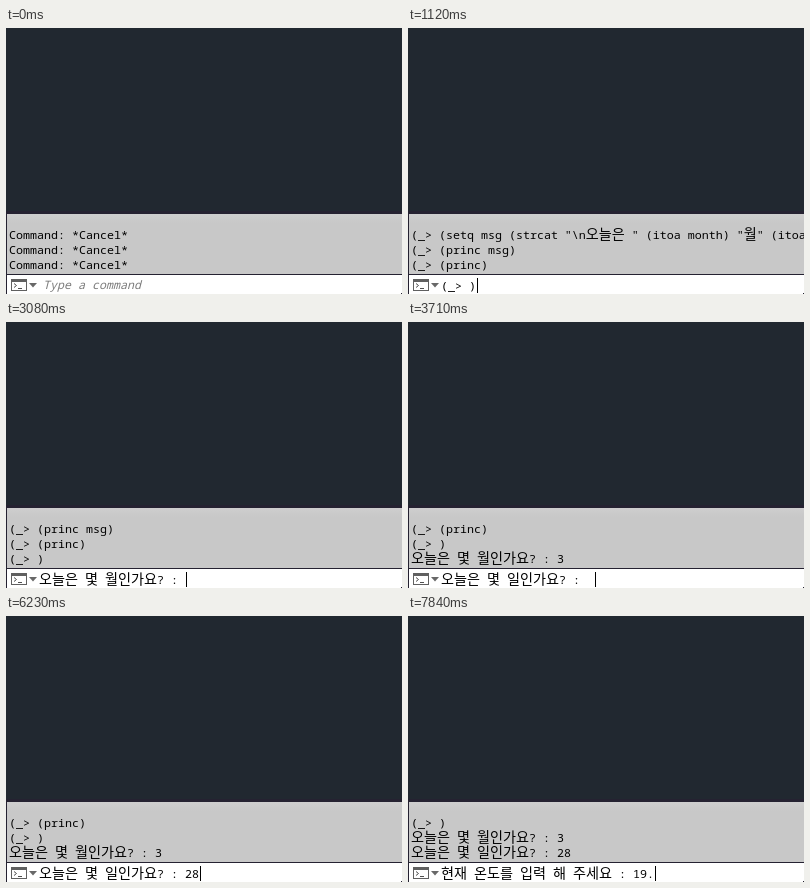
Write an HTML page that moves like this. It is 396 px wide and 266 px high and loops after 8000 ms.

```html
<!DOCTYPE html>
<html lang="ko">
<head>
<meta charset="utf-8">
<title>Command line</title>
<style>
  html, body { margin: 0; width: 100%; height: 100%; overflow: hidden; background: #212830; }
  svg { display: block; }
  text { font: 11.667px "Noto Sans Mono", "DejaVu Sans Mono", monospace; white-space: pre; fill: #000; }
  .ko { font: 14.13px "Noto Sans CJK KR", "Noto Sans CJK", sans-serif; }
  #hint { font-style: italic; fill: #7c7c7c; }
</style>
</head>
<body>
<svg width="396" height="266" viewBox="0 0 396 266">
  <defs>
    <linearGradient id="panel" x1="0" y1="0" x2="0" y2="1">
      <stop offset="0" stop-color="#cecece"/>
      <stop offset=".15" stop-color="#c8c8c8"/>
    </linearGradient>
  </defs>
  <rect width="396" height="266" fill="#212830"/>
  <g shape-rendering="crispEdges">
    <rect y="183" width="396" height="83" fill="#252231"/>
    <rect x="1" y="186" width="395" height="60" fill="url(#panel)"/>
    <rect x="1" y="247" width="395" height="19" fill="#fff"/>
    <rect x="395" y="265" width="1" height="1" fill="#252231"/>
    <rect x="5.5" y="251.5" width="15" height="11" fill="#fff" stroke="#606060"/>
    <rect x="5" y="251" width="16" height="3" fill="#606060"/>
  </g>
  <path d="M8 255.5l2.5 2-2.5 2M12 260.5h4" fill="none" stroke="#505050"/>
  <path d="M23 255h8l-4 4.5z" fill="#686868"/>
  <text class="log" x="3" y="211"></text>
  <text class="log" x="3" y="226"></text>
  <text class="log" x="3" y="241"></text>
  <text id="hint" x="37" y="261">Type a command</text>
  <text id="input" x="33" y="262"></text>
  <rect id="caret" y="250" width="1" height="15" shape-rendering="crispEdges"/>
</svg>
<script>
  const LOOP = 8000, OFF = -9;
  const month = '오늘은 몇 월인가요? : ';
  const day = '오늘은 몇 일인가요? : ';
  const temp = '현재 온도를 입력 해 주세요 : ';
  const cancel = 'Command: *Cancel*';
  const lines = [
    cancel, cancel, cancel,
    '(_> (setq msg (strcat "\\n오늘은 " (itoa month) "월" (itoa day) "일"',
    '(_> (princ msg)', '(_> (princ)', '(_> )',
    month + '3', day + '28'
  ];

  // [start ms, first log line, input text, caret x]
  const steps = [
    [0, 0, null, OFF],
    [490, 0, '', 34],
    [1120, 3, '(_> )', 69],
    [1680, 3, '(_> )', OFF],
    [1890, 4, month, 180],
    [2520, 4, month, OFF],
    [3080, 4, month, 180],
    [3220, 4, month + '3', 187],
    [3710, 5, day, 187],
    [3780, 5, day, 180],
    [4270, 5, day, OFF],
    [4830, 5, day, 180],
    [5320, 5, day, OFF],
    [5880, 5, day + '2', 187],
    [6160, 5, day + '28', 187],
    [6230, 5, day + '28', 194],
    [6510, 6, temp, 226],
    [7140, 6, temp, OFF],
    [7490, 6, temp + '1', 233],
    [7560, 6, temp + '19', 240],
    [7840, 6, temp + '19.', 247]
  ];

  const $ = id => document.getElementById(id);
  const rows = document.querySelectorAll('.log');

  function write(el, str) {
    el.replaceChildren(...str.split(/([가-힣]+)/).filter(Boolean).map(run => {
      const span = document.createElementNS('http://www.w3.org/2000/svg', 'tspan');
      if (/[가-힣]/.test(run)) span.setAttribute('class', 'ko');
      span.textContent = run;
      return span;
    }));
  }

  let shown;
  function draw(now) {
    const t = now % LOOP;
    const step = steps.findLast(s => s[0] <= t);
    if (step !== shown) {
      shown = step;
      const [, first, input, caret] = step;
      rows.forEach((row, i) => write(row, lines[first + i]));
      write($('input'), input || '');
      $('hint').style.visibility = input === null ? 'visible' : 'hidden';
      $('caret').setAttribute('x', caret);
    }
  }

  const origin = performance.now();
  function tick() {
    draw(performance.now() - origin);
    requestAnimationFrame(tick);
  }
  tick();
</script>
</body>
</html>
```
